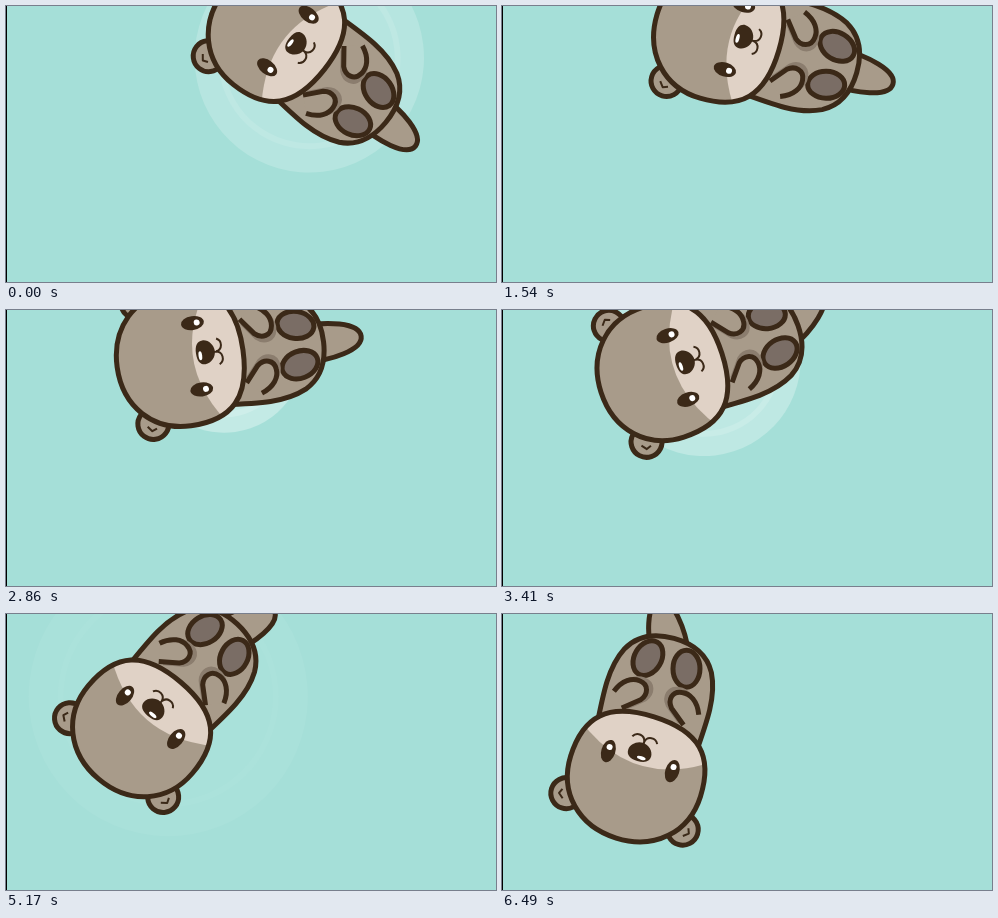
An HTML page with a canvas for the animation above (6600 ms loop, 490 by 276 pixels).

```html
<!DOCTYPE html>
<html lang="en">
<head>
<meta charset="utf-8">
<title>Floating otter</title>
<style>
html, body { margin: 0; width: 100%; height: 100%; overflow: hidden; background: #a5dfd8; }
canvas { display: block; }
</style>
</head>
<body>
<canvas id="stage" width="490" height="276"></canvas>
<script>
const ctx = document.getElementById('stage').getContext('2d');
const LOOP = 6600, STEP = 110, DEG = Math.PI / 180;
const LINE = '#3b2918', FUR = '#a89b8a', FACE = '#e0d2c6', PAW = '#7a6d65', SHADE = '#8b7d6e';

// time, head x, head y, turn in degrees
const KEYS = [
  [0, 268, 24, -51.7],
  [880, 238, 21, -62],
  [2310, 190, 37, -88],
  [3410, 159, 63, -108],
  [4400, 139, 91, -126.5],
  [5830, 131, 140, -151],
  [6490, 133, 164, -162.6]
];

const HEAD = new Path2D('M0-63C40-63 68-36 68 2C68 44 48 64 0 64C-48 64-68 44-68 2C-68-36-40-63 0-63Z');
const MASK = new Path2D('M-70 39Q0-12 70 39V80H-70Z');
const BODY = new Path2D('M-51 35C-54 75-56 100-45 122C-35 140-18 145 0 145C18 145 35 140 45 122C56 100 54 75 51 35Z');
const TAIL = new Path2D('M-18-6C-20 20-14 53 0 53C14 53 20 20 18-6Z');
const ARM = new Path2D('M44 78C39 91 30 96 22 95C12 94 10 84 16 77L32 64');
const MOUTH = new Path2D('M2 34V37C1 44-8 45-11 39M2 37C3 44 12 45 15 39');
const NOSE = new Path2D('M3 17C11 17 15 20 15 25C15 31 9 36 3 36C-3 36-9 31-9 25C-9 20-5 17 3 17Z');

// Cubic Hermite curve through the keys
function pose(t) {
  let i = 0;
  while (i < KEYS.length - 2 && t > KEYS[i + 1][0]) i++;
  const a = KEYS[i], b = KEYS[i + 1], span = b[0] - a[0], u = (t - a[0]) / span;
  const slope = (k, c) => {
    const p = KEYS[Math.max(k - 1, 0)], n = KEYS[Math.min(k + 1, KEYS.length - 1)];
    return (n[c] - p[c]) / (n[0] - p[0]) * span;
  };
  return [1, 2, 3].map(c => {
    const d = b[c] - a[c], m = slope(i, c), n = slope(i + 1, c);
    return a[c] + u * (m + u * (3 * d - 2 * m - n + u * (m + n - 2 * d)));
  });
}

const swing = (t, peak) => Math.cos(2 * Math.PI * (t - peak) / 2850);

function oval(x, y, rx, ry = rx, tilt = 0) {
  const path = new Path2D();
  path.ellipse(x, y, rx, ry, tilt * DEG, 0, 2 * Math.PI);
  return path;
}

function fill(path, color) {
  ctx.fillStyle = color;
  ctx.fill(path);
}

function line(path, width, color = LINE) {
  ctx.lineWidth = width;
  ctx.strokeStyle = color;
  ctx.stroke(path);
}

function shape(path, color, width = 5) {
  fill(path, color);
  line(path, width);
}

function bothSides(draw) {
  for (const side of [1, -1]) {
    ctx.save();
    ctx.scale(side, 1);
    draw();
    ctx.restore();
  }
}

function ripple(age) {
  const alpha = Math.min(0.36, 0.3 - age * 0.00014);
  if (age < -1000 || alpha <= 0) return;
  const r = 97 + 0.029 * age - 0.0000027 * age * age;
  fill(oval(0, 45, r), `rgba(255,255,255,${alpha * 0.9})`);
  line(oval(0, 45, r * 0.77), 6, `rgba(255,255,255,${alpha * 0.5})`);
}

function body(t) {
  ctx.save();
  ctx.translate(0, 20);
  ctx.rotate((0.3 - 2.5 * swing(t, 950)) * DEG);
  ctx.translate(0, -20);

  ctx.save();
  ctx.translate(0, 130);
  ctx.rotate(-(3 + 24 * swing(t, 750)) * DEG);
  shape(TAIL, FUR);
  ctx.restore();

  shape(BODY, FUR);
  bothSides(() => {
    shape(oval(20, 119, 13.5, 18.5, 15), PAW);
    ctx.save();
    ctx.translate(-4, 2);
    line(ARM, 5, SHADE);
    ctx.restore();
    shape(ARM, FUR);
  });
  ctx.restore();
}

function head() {
  bothSides(() => {
    shape(oval(61, -35, 15.5), FUR);
    line(new Path2D('M63-41L68-37L66-32'), 2);
  });

  fill(HEAD, FUR);
  ctx.save();
  ctx.clip(HEAD);
  fill(MASK, FACE);
  ctx.restore();
  line(HEAD, 5);

  bothSides(() => {
    fill(oval(33.5, 17.7, 7, 11.5), LINE);
    fill(oval(33.5, 22, 3), '#fff');
  });
  fill(NOSE, LINE);
  fill(oval(0, 21, 4.5, 1.8), '#fff');
  line(MOUTH, 2);
}

function draw(now) {
  const t = Math.floor(now % LOOP / STEP) * STEP;
  const [x, y, turn] = pose(t);
  ctx.fillStyle = '#a5dfd8';
  ctx.fillRect(0, 0, 490, 276);
  ctx.save();
  ctx.translate(x, y);
  ctx.rotate(turn * DEG);
  ctx.lineJoin = 'round';
  ripple(t + 650);
  ripple(t - 3410);
  body(t);
  head();
  ctx.restore();
  ctx.fillStyle = '#000';
  ctx.fillRect(0, 0, 1, 276);
}

const start = performance.now();
function tick() {
  draw(performance.now() - start);
  requestAnimationFrame(tick);
}
tick();
</script>
</body>
</html>
```
